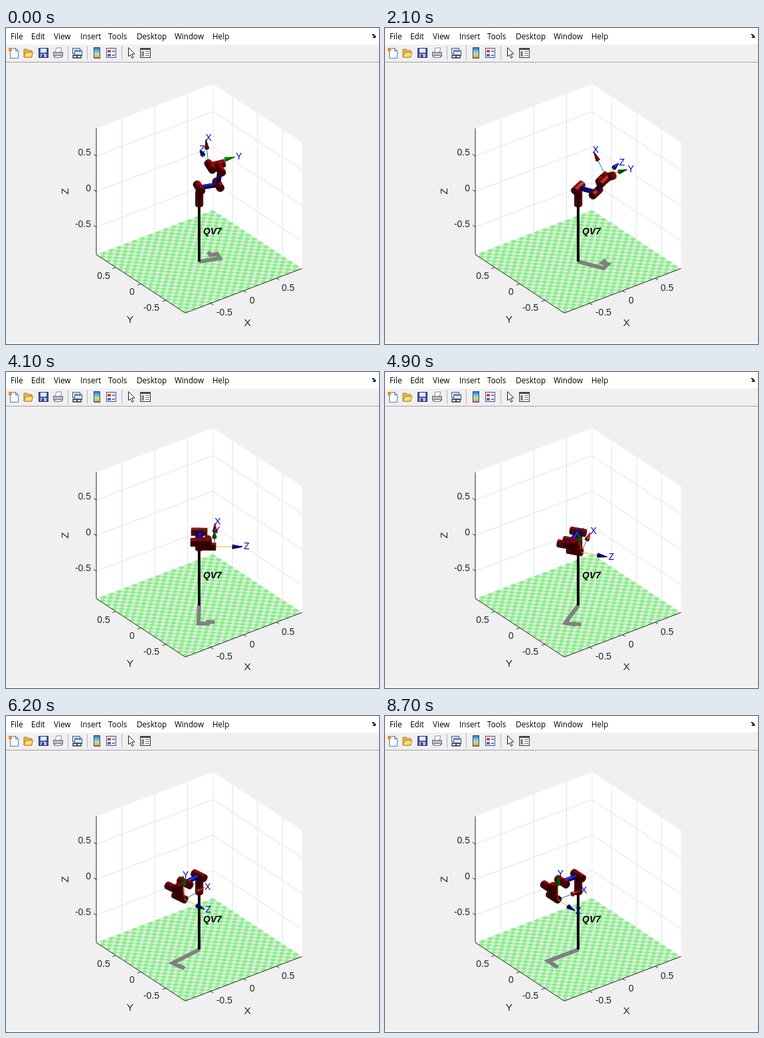
These frames come from a looping animation (562 px wide and 476 px high, 9.3 s). An HTML page with a canvas:

```html
<!DOCTYPE html>
<html lang="en">
<head>
<meta charset="utf-8">
<title>Robot arm plot</title>
<style>
  html, body { margin: 0; width: 100%; height: 100%; overflow: hidden; background: #f0f0f0; }
  canvas { display: block; }
</style>
</head>
<body>
<canvas id="stage" width="562" height="476"></canvas>
<script>
const W = 562, H = 476, LOOP = 9300, STEP = 100, LAST = 87;
const REACH = 0.8884, RAD = Math.PI / 180;
const ctx = document.getElementById('stage').getContext('2d');
const backdrop = document.createElement('canvas');
backdrop.width = W;
backdrop.height = H;

// vectors and projection
const add = (a, b, k = 1) => a.map((v, i) => v + k * b[i]);
const dot = (a, b) => a[0] * b[0] + a[1] * b[1] + a[2] * b[2];
const cross = (a, b) => [a[1] * b[2] - a[2] * b[1], a[2] * b[0] - a[0] * b[2], a[0] * b[1] - a[1] * b[0]];
const unit = a => { const n = Math.hypot(...a); return a.map(v => v / n); };
const mix = (a, b, t) => a.map((v, i) => v * Math.cos(t) + b[i] * Math.sin(t));
const project = ([x, y, z]) => [291 + 99 * x - 75.4 * y, 256.8 - 37.7 * x - 49.5 * y - 107 * z];

const VIEW = unit([-0.527, -0.687, 0.5]);
const LIGHT = unit([1, 0, 1]);
const HALF = unit(add(VIEW, LIGHT));
const RED = [178, 0, 0], BLUE = [0, 0, 255];
const AXES = [
  ['X', [255, 0, 0], '#0072bd'],
  ['Y', [0, 255, 0], '#d95319'],
  ['Z', [0, 0, 255], '#edb120']
];

function shade(color, normal) {
  const diffuse = 0.3 + 0.6 * Math.max(0, dot(normal, LIGHT));
  const gloss = 75 * Math.pow(Math.max(0, dot(normal, HALF)), 16);
  return `rgb(${color.map(c => Math.min(255, Math.round(c * diffuse + gloss))).join()})`;
}

function trace(g, points) {
  g.beginPath();
  points.forEach((p, i) => g[i ? 'lineTo' : 'moveTo'](...project(p)));
}

function line(g, points, color, width = 1) {
  trace(g, points);
  g.strokeStyle = color;
  g.lineWidth = width;
  g.stroke();
}

function text(g, s, x, y, font, color = '#262626', align = 'center') {
  g.font = font;
  g.fillStyle = color;
  g.textAlign = align;
  g.textBaseline = 'middle';
  g.fillText(s, x, y);
}

// solids are collected as faces and painted back to front
let faces = [];

function addFace(points, color, normal) {
  if (normal && dot(normal, VIEW) <= 0) return;
  const depth = points.reduce((sum, p) => sum + dot(p, VIEW), 0) / points.length;
  faces.push({ points, depth, color: normal ? shade(color, normal) : color });
}

function addTube(origin, axis, from, to, r0, r1, color) {
  const sides = 24, parts = Math.ceil(Math.abs(to - from) / 0.02);
  const u = unit(cross(axis, Math.abs(axis[2]) > 0.9 ? [1, 0, 0] : [0, 0, 1]));
  const v = cross(axis, u);
  const spokes = Array.from({ length: sides }, (_, i) => mix(u, v, i * 2 * Math.PI / sides));
  const rings = Array.from({ length: parts + 1 }, (_, k) => {
    const f = k / parts, center = add(origin, axis, from + (to - from) * f);
    return spokes.map(s => add(center, s, r0 + (r1 - r0) * f));
  });
  for (let i = 0; i < sides; i++) {
    const next = (i + 1) % sides;
    const normal = unit(add(spokes[i], spokes[next]));
    for (let k = 0; k < parts; k++) {
      addFace([rings[k][i], rings[k][next], rings[k + 1][next], rings[k + 1][i]], color, normal);
    }
  }
  const out = axis.map(c => c * Math.sign(to - from));
  addFace(rings[0], color, out.map(c => -c));
  if (r1) addFace(rings[parts], color, out);
}

function paintFaces() {
  faces.sort((a, b) => a.depth - b.depth);
  for (const f of faces) {
    line(ctx, f.points, f.color, f.points.length > 2 ? 0.6 : 1);
    if (f.points.length > 2) {
      ctx.fillStyle = f.color;
      ctx.fill();
    }
  }
  faces = [];
}

// Denavit-Hartenberg rows: d, a, alpha
const LINKS = [
  [0.1519, 0, 90], [0, -0.24365, 0], [0, -0.21325, 0],
  [0.11235, 0, 90], [0.08535, 0, -90], [0.0819, 0, 0]
];
const START = [170, 0, -90, 180, 0, 0];

function drawArm(blend) {
  let p = [0, 0, 0], x = [1, 0, 0], y = [0, 1, 0], z = [0, 0, 1];
  const track = [p];
  LINKS.forEach(([d, a, alpha], i) => {
    addTube(p, z, -0.095, 0.095, 0.046, 0.046, RED);
    if (d) addTube(p, z, 0, d, 0.026, 0.026, BLUE);
    p = add(p, z, d);
    const q = START[i] * RAD * (1 - blend);
    [x, y] = [mix(x, y, q), mix(y, x.map(c => -c), q)];
    if (a) addTube(p, x, 0, a, 0.026, 0.026, BLUE);
    p = add(p, x, a);
    [y, z] = [mix(y, z, alpha * RAD), mix(z, y.map(c => -c), alpha * RAD)];
    track.push(p);
  });

  ctx.lineJoin = 'miter';
  line(ctx, track.map(([a, b]) => [a, b, -REACH]), '#808080', 6);
  ctx.lineJoin = 'round';
  line(ctx, [[0, 0, -REACH], [0, 0, 0]], '#000', 4);
  text(ctx, 'QV7', 297, 307, 'italic bold 14px "Liberation Sans", Arial, sans-serif', '#000', 'left');

  const dirs = [x, y, z];
  AXES.forEach(([, color, stroke], i) => {
    for (let k = 0; k < 4; k++) {
      addFace([add(p, dirs[i], k * 0.055), add(p, dirs[i], (k + 1) * 0.055)], stroke);
    }
    addTube(p, dirs[i], 0.215, 0.335, 0.026, 0, color);
  });
  paintFaces();
  AXES.forEach(([name], i) => {
    const [lx, ly] = project(add(p, dirs[i], 0.355));
    text(ctx, name, lx + 4, ly, '14px "Liberation Sans", Arial, sans-serif', '#0000c8');
  });
}

// static window, toolbar and axes
function drawMenu(g) {
  const items = [['File', 7], ['Edit', 38], ['View', 72], ['Insert', 112], ['Tools', 154],
    ['Desktop', 197], ['Window', 254], ['Help', 311]];
  box(g, 0, 0, W, 25, '#fff');
  for (const [s, x] of items) text(g, s, x, 13.5, '11.7px "Open Sans", sans-serif', '#000', 'left');
  poly(g, [[551, 9], [554, 9], [556, 12], [557, 10], [557, 15], [552, 15], [554, 13]], '#222');
}

function poly(g, points, fill, stroke) {
  g.beginPath();
  points.forEach(p => g.lineTo(...p));
  g.closePath();
  g.lineWidth = 1;
  if (fill) { g.fillStyle = fill; g.fill(); }
  if (stroke) { g.strokeStyle = stroke; g.stroke(); }
}

function box(g, x, y, w, h, fill, stroke) {
  g.fillStyle = fill;
  g.fillRect(x, y, w, h);
  if (!stroke) return;
  g.strokeStyle = stroke;
  g.lineWidth = 1;
  g.strokeRect(x + 0.5, y + 0.5, w - 1, h - 1);
}

function drawToolbar(g) {
  box(g, 0, 51, W, 1, '#a5a5a5');
  for (const x of [93, 122, 174]) box(g, x, 27, 1, 21, '#b4b4b4');
  // new
  poly(g, [[6.5, 30.5], [14.5, 30.5], [18.5, 34.5], [18.5, 45.5], [6.5, 45.5]], '#f8fbff', '#5479ad');
  poly(g, [[14.5, 30.5], [14.5, 34.5], [18.5, 34.5]], '#c8daf0', '#5479ad');
  box(g, 4, 30, 5, 5, '#f08a24');
  // open
  poly(g, [[27, 44], [27, 32], [32, 32], [34, 34], [39, 34], [39, 44]], '#e9b84d', '#a97919');
  poly(g, [[27, 44], [30, 37], [41, 37], [38, 44]], '#ffe27c', '#b58625');
  // save
  box(g, 49, 30, 15, 15, '#4059a8', '#26366f');
  box(g, 52, 31, 9, 6, '#e6edff');
  box(g, 52, 39, 9, 5, '#b8c0d7');
  box(g, 54, 40, 3, 4, '#26366f');
  // print
  poly(g, [[74, 37], [76, 30], [84, 30], [82, 37]], '#fff', '#8a8a9a');
  box(g, 71, 36, 15, 7, '#b9bcc8', '#656a78');
  box(g, 73, 41, 11, 4, '#eee', '#777');
  // link
  box(g, 100, 30, 12, 9, '#dce7f7', '#405a8a');
  box(g, 103, 33, 12, 9, '#dce7f7', '#405a8a');
  box(g, 103, 33, 12, 3, '#7088b4');
  g.strokeStyle = '#333b50';
  g.lineWidth = 1.5;
  g.strokeRect(101, 41, 6, 4);
  g.strokeRect(107, 41, 6, 4);
  // colorbar
  const bar = g.createLinearGradient(0, 30, 0, 45);
  ['#4267dd', '#55cfe4', '#e5dc70', '#dd7e55'].forEach((c, i) => bar.addColorStop(i / 3, c));
  box(g, 132, 29, 10, 17, bar, '#304978');
  // legend
  box(g, 151, 30, 15, 15, '#fff', '#384b91');
  box(g, 153, 33, 5, 4, '#df4343');
  box(g, 153, 39, 5, 4, '#5264d8');
  box(g, 160, 34, 4, 2, '#cf5555');
  box(g, 160, 40, 4, 2, '#6170cf');
  // pointer
  poly(g, [[184.5, 29.5], [184.5, 43], [187.5, 40], [190, 45.5], [192, 44.5], [189.8, 39.3], [194, 39]], '#fff', '#222');
  // property panel
  box(g, 202, 30, 16, 15, '#fff', '#333');
  box(g, 202, 30, 16, 3, '#444');
  box(g, 204, 35, 4, 8, '#8b8b8b');
  for (const y of [35, 38, 41]) box(g, 210, y, 6, 1, '#666');
}

function drawAxes(g) {
  const R = REACH, marks = [-0.5, 0, 0.5];
  const fill = (points, color) => { trace(g, points); g.fillStyle = color; g.fill(); };
  fill([[-R, R, -R], [R, R, -R], [R, R, R], [-R, R, R]], '#fff');
  fill([[R, R, -R], [R, -R, -R], [R, -R, R], [R, R, R]], '#fff');
  for (const m of marks) {
    line(g, [[m, R, -R], [m, R, R]], '#e2e2e2');
    line(g, [[R, m, -R], [R, m, R]], '#e2e2e2');
    line(g, [[-R, R, m], [R, R, m], [R, -R, m]], '#e2e2e2');
  }
  line(g, [[R, R, -R], [R, R, R]], '#e8e8e8');

  const count = 30, tile = 2 * R / count;
  fill([[-R, -R, -R], [R, -R, -R], [R, R, -R], [-R, R, -R]], '#e2e8e2');
  for (let i = 0; i < count; i++) {
    for (let j = i % 2; j < count; j += 2) {
      const x = -R + i * tile, y = -R + j * tile;
      fill([[x, y, -R], [x + tile, y, -R], [x + tile, y + tile, -R], [x, y + tile, -R]], '#80f580');
    }
  }

  line(g, [[-R, R, R], [-R, R, -R], [-R, -R, -R], [R, -R, -R]], '#262626');
  for (const m of marks) {
    line(g, [[m, -R, -R], [m, -R - 0.05, -R]], '#262626');
    line(g, [[-R, m, -R], [-R - 0.05, m, -R]], '#262626');
    line(g, [[-R, R, m], [-R, R + 0.05, m]], '#262626');
  }

  const small = '14px "Liberation Sans", Arial, sans-serif';
  const large = '15.5px "Liberation Sans", Arial, sans-serif';
  [['0.5', 188], ['0', 242], ['-0.5', 296]].forEach(([s, y]) => text(g, s, 128, y, small, '#262626', 'right'));
  [['0.5', 147, 374], ['0', 190, 398], ['-0.5', 219, 422],
    ['-0.5', 329, 429], ['0', 371, 411], ['0.5', 425, 392]].forEach(([s, x, y]) => text(g, s, x, y, small));
  text(g, 'Y', 187, 440, large);
  text(g, 'X', 364, 445, large);
  g.save();
  g.translate(90, 246);
  g.rotate(-Math.PI / 2);
  text(g, 'Z', 0, 0, large);
  g.restore();
}

function drawBackdrop(g) {
  box(g, 0, 0, W, H, '#f0f0f0');
  drawMenu(g);
  drawToolbar(g);
  drawAxes(g);
  box(g, 0, 474, W, 2, '#f8f8f8');
}

// quintic ease, already under way when the loop begins; two ticks repeat a pose
function blendAt(ms) {
  const tick = Math.min(LAST, Math.floor((ms % LOOP) / STEP));
  const pose = tick - (tick >= 10) - (tick >= 48);
  const s = Math.min(1, 0.2 + 0.0102 * pose);
  return s * s * s * (10 - 15 * s + 6 * s * s);
}

const startTime = performance.now();
function render() {
  ctx.drawImage(backdrop, 0, 0);
  drawArm(blendAt(Math.max(0, performance.now() - startTime)));
  requestAnimationFrame(render);
}

drawBackdrop(backdrop.getContext('2d'));
render();
</script>
</body>
</html>
```
